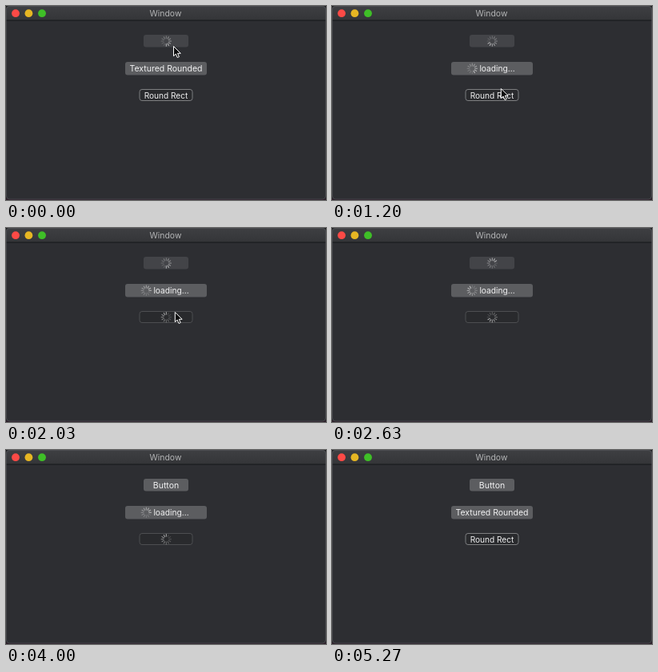
Animation, 400 px wide and 243 px high, one loop 5510 ms. Source, as an HTML page:

```html
<!DOCTYPE html>
<html lang="en">
<head>
<meta charset="utf-8">
<title>Loading buttons</title>
<style>
  html, body { margin: 0; width: 100%; height: 100%; overflow: hidden; background: #17181a; }
  svg { display: block; width: 100%; height: 100%; }
  text { font-family: Inter, "Open Sans", sans-serif; font-size: 10.5px; fill: #f1f1f2; text-anchor: middle; }
  #title { font-size: 10.4px; fill: #b3b4b5; }
  #label3 { font-size: 10.1px; }
  #loading { font-size: 10.2px; }
  .spinner { stroke: #fff; stroke-width: 1.05; stroke-linecap: round; }
</style>
</head>
<body>
<svg viewBox="0 0 400 243">
  <defs>
    <linearGradient id="bar" x2="0" y2="1">
      <stop stop-color="#3e3f42"/>
      <stop offset="1" stop-color="#343538"/>
    </linearGradient>
  </defs>
  <rect width="400" height="243" fill="#17181a"/>
  <rect y="241" width="400" height="2" fill="#2b1d28"/>
  <rect width="400" height="242" rx="4" fill="#2d2e32"/>
  <path d="M0 18V4a4 4 0 0 1 4-4H396a4 4 0 0 1 4 4V18Z" fill="url(#bar)"/>
  <path d="M0 18H400" stroke="#151618"/>
  <rect x=".5" y=".5" width="399" height="241.5" rx="4" fill="none" stroke="#54555a" stroke-opacity=".6"/>
  <circle cx="12" cy="9.2" r="4.9" fill="#fc4a46"/>
  <circle cx="28.4" cy="9.2" r="4.9" fill="#e6b623"/>
  <circle cx="45" cy="9.2" r="4.9" fill="#3fbf27"/>
  <text id="title" x="199.5" y="13">Window</text>

  <rect id="box1" x="172" y="36" width="56" height="15.6" rx="3"/>
  <text id="label1" x="200" y="47.8">Button</text>

  <rect id="box2" x="149" y="70" width="102" height="16.6" rx="3"/>
  <text id="label2" x="200" y="82.4">Textured Rounded</text>
  <text id="loading" x="206.5" y="82.4">loading...</text>

  <rect id="box3" x="167" y="104.5" width="66" height="14" rx="3"/>
  <text id="label3" x="200" y="115.7">Round Rect</text>

  <g id="spinners"></g>
  <path id="cursor" d="M0 0V12.2L2.8 9.6L4.7 14L6.9 13.1L5 8.8H8.8Z"
        fill="#0b0b0c" stroke="#fff" stroke-width="1" stroke-linejoin="round"/>
</svg>
<script>
const LOOP = 5510, SPOKES = 12, TURN = 1000, TICKS = 24;
const NS = 'http://www.w3.org/2000/svg';
const $ = id => document.getElementById(id);

// [time, x, y] of the pointer tip
const path = [
  [0, 209.5, 50.5], [70, 209.5, 50.5], [330, 213.5, 66], [580, 217.5, 81.5],
  [930, 217.5, 81.5], [1200, 211.3, 103.5], [1390, 211.3, 113.5],
  [1640, 211.3, 113.5], [1760, 211.3, 109.3], [1950, 211.3, 105.5]
];
const CURSOR_GONE = 2200;

function makeSpinner(x, y, phase) {
  const g = document.createElementNS(NS, 'g');
  g.setAttribute('class', 'spinner');
  g.setAttribute('transform', `translate(${x} ${y})`);
  const spokes = Array.from({ length: SPOKES }, (_, i) => {
    const line = document.createElementNS(NS, 'path');
    line.setAttribute('d', 'M0-3.4V-6.2');
    line.setAttribute('transform', `rotate(${i * 360 / SPOKES})`);
    return g.appendChild(line);
  });
  $('spinners').append(g);

  return (t, on) => {
    show(g, on);
    const head = Math.floor(t / TURN * TICKS) / TICKS + phase;
    spokes.forEach((line, i) => {
      const age = ((head - i / SPOKES) % 1 + 1) % 1;
      line.setAttribute('stroke-opacity', (0.14 + 0.5 * (1 - age) ** 1.3).toFixed(3));
    });
  };
}

const spin1 = makeSpinner(200.3, 44, 0.55);
const spin2 = makeSpinner(175.3, 78.3, 0.3);
const spin3 = makeSpinner(200.3, 111.7, 0.05);

const between = (t, a, b) => t >= a && t < b;

function show(el, on) {
  el.style.display = on ? '' : 'none';
}

function paint(el, fill, stroke = 'none') {
  el.setAttribute('fill', fill);
  el.setAttribute('stroke', stroke);
}

function pointerAt(t) {
  const i = path.findIndex(p => p[0] > t);
  if (i < 0) return path[path.length - 1].slice(1);
  const [t0, x0, y0] = path[i - 1], [t1, x1, y1] = path[i];
  const k = (t - t0) / (t1 - t0), e = k * k * (3 - 2 * k);
  return [x0 + (x1 - x0) * e, y0 + (y1 - y0) * e];
}

function draw(t) {
  const busy1 = t < 3200;
  paint($('box1'), busy1 ? '#434448' : '#5c5d60');
  show($('label1'), !busy1);
  spin1(t, busy1);

  const busy2 = between(t, 930, 4330);
  paint($('box2'), between(t, 680, 930) ? '#747578' : '#5c5d60');
  show($('label2'), !busy2);
  show($('loading'), busy2);
  spin2(t, busy2);

  const busy3 = between(t, 1640, 5130);
  const dim3 = between(t, 1640, 5270);
  paint($('box3'), between(t, 1440, 1640) ? '#55565a' : '#292a2d', dim3 ? '#4d4e51' : '#7d7e80');
  show($('label3'), !busy3);
  spin3(t, busy3);

  $('cursor').setAttribute('transform', `translate(${pointerAt(t)})`);
  show($('cursor'), t < CURSOR_GONE);
}

const start = performance.now();
function tick() {
  draw((performance.now() - start) % LOOP);
  requestAnimationFrame(tick);
}
tick();
</script>
</body>
</html>
```
